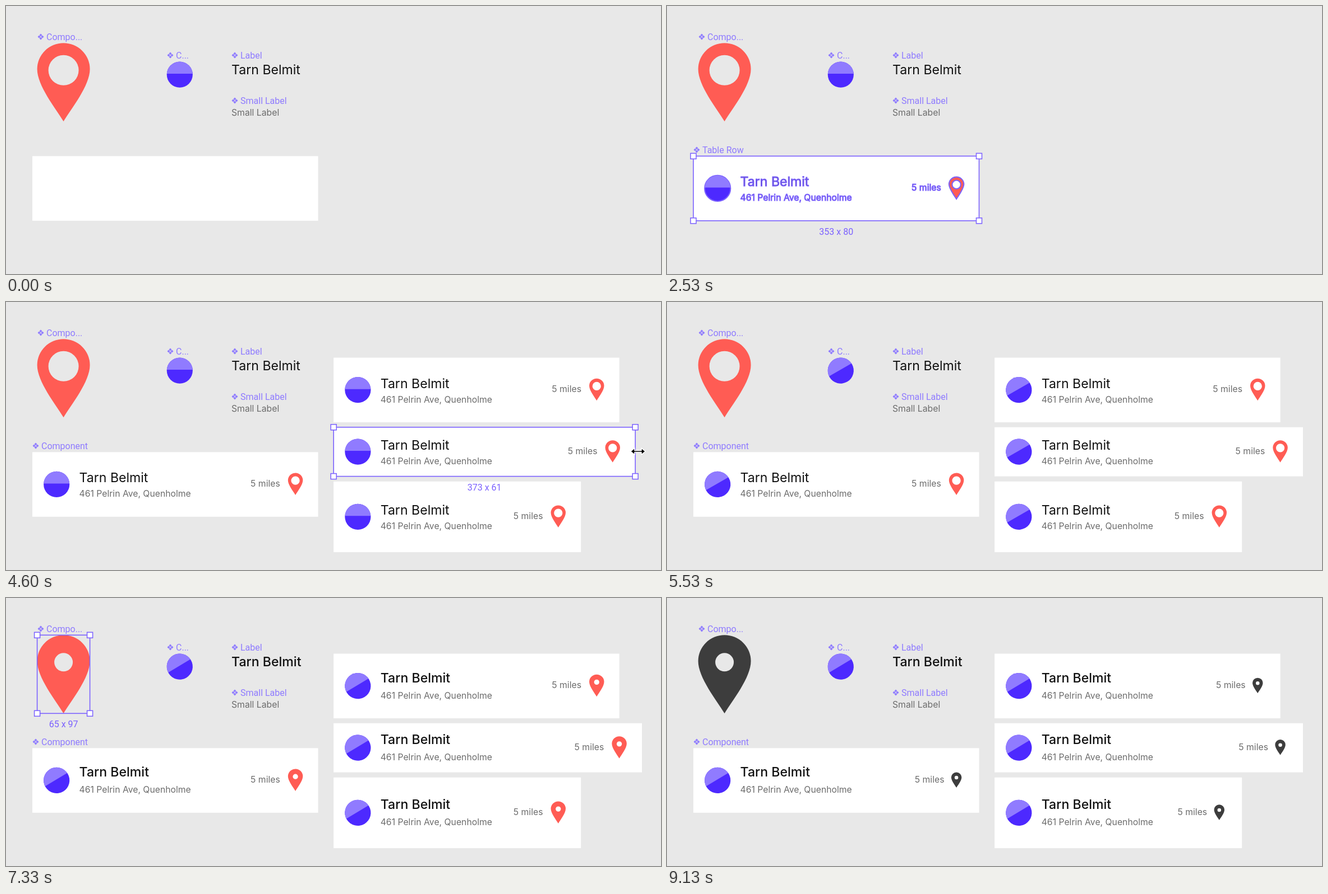
Animation, 1168 px wide and 479 px high, one loop 9.27 s. Source, as an HTML page:

```html
<!DOCTYPE html>
<html lang="en">
<head>
<meta charset="utf-8">
<title>Components</title>
<style>
html, body { margin: 0; height: 100%; overflow: hidden; background: #e8e8e8 }
svg { display: block; width: 100vw; height: 100vh }
.name { font: 23.1px Inter, sans-serif; fill: #111 }
.medium { font-weight: 500 }
.small { font: 15.75px Inter, sans-serif; fill: #6c6c6c }
.label { font: 16px Roboto, sans-serif; fill: #8f7bff }
.size { font: 16px Roboto, sans-serif; fill: #7b61ff; text-anchor: middle }
.end { text-anchor: end }
.sel { fill: none; stroke: #7b61ff; stroke-width: 1.6 }
.grip { fill: #fff; stroke: #7b61ff; stroke-width: 1.5 }
.hot text { stroke: #7b61ff; stroke-width: 1; fill: #6650d0 }
.hot .shape { stroke: #7b61ff; stroke-width: 2; vector-effect: non-scaling-stroke }
.red { fill: none; stroke: #f03a22; stroke-width: 1.7 }
.redline { fill: none; stroke: #cf3d2f; stroke-width: 1.3 }
.dash { fill: none; stroke: #6d7f86; stroke-width: 1.2; stroke-dasharray: 3 2 }
.cursor { fill: #000; stroke: #fff; stroke-width: 1.5; stroke-linejoin: round }
.copy { fill: #fff; stroke: #333; stroke-width: 2; stroke-linejoin: round }
</style>
</head>
<body>
<svg id="stage" viewBox="0 0 1168 479"></svg>
<script>
const LOOP = 9270, STEP = 1000 / 15, UNIT = 509.5 / 353;
const PERSON = 'Tarn Belmit', ADDRESS = '461 Pelrin Ave, Quenholme';
const stage = document.getElementById('stage');

const mix = (a, b, p) => a + (b - a) * p;
const ramp = (t, from, to) => Math.min(1, Math.max(0, (t - from) / (to - from)));
const ease = (t, from, to) => { const p = ramp(t, from, to); return p * p * (3 - 2 * p); };

const text = (cls, x, y, s) => `<text class="${cls}" x="${x}" y="${y}">${s}</text>`;
const path = (cls, d) => `<path class="${cls}" d="${d}"/>`;
const rect = (cls, x, y, w, h) => `<rect class="${cls}" x="${x}" y="${y}" width="${w}" height="${h}"/>`;
const redBox = (x, y, w, h) => rect('red', x + .9, y + .9, w - 1.8, h - 1.8);

function label(x, y, s) {
  const diamonds = [[0, -3], [3, 0], [0, 3], [-3, 0]]
    .map(([dx, dy]) => `M${x + 6 + dx} ${y + dy - 2.5}l2.5 2.5-2.5 2.5-2.5-2.5z`).join('');
  return `<path fill="#8f7bff" d="${diamonds}"/>` + text('label', x + 16, y + 5.7, s);
}

function avatar(x, y, angle) {
  return `<g transform="translate(${x} ${y}) rotate(${angle})">
    <circle class="shape" r="23.1" fill="#4d29ff"/>
    <path fill="#907bff" d="M-23.05-1.5A23.1 23.1 0 0 1 23.05-1.5z"/></g>`;
}

function pin(x, y, scale, look) {
  const r = look.hole;
  return `<path class="shape" fill="${look.color}" fill-rule="evenodd"
    transform="translate(${x} ${y}) scale(${scale}) translate(0 -70)"
    d="M0 140C-14 117-47 76-47 46.5A47 46.5 0 0 1 47 46.5C47 76 14 117 0 140z
       M${-r} 48.5a${r} ${r} 0 0 0 ${2 * r} 0a${r} ${r} 0 0 0 ${-2 * r} 0z"/>`;
}

function row(x, y, w, h, look, parts = {}) {
  const cy = y + h / 2, right = x + w, has = k => parts[k] !== false;
  return `<g class="${parts.hot ? 'hot' : ''}">` + `<rect x="${x}" y="${y}" width="${w}" height="${h}" fill="#fff"/>`
    + (has('avatar') ? avatar(x + 43.2, cy - .1, look.angle) : '')
    + (has('name') ? text('name ' + look.weight, x + 83.5, cy - 3.7 - look.lift, PERSON) : '')
    + (has('address') ? text('small', x + 83.5, cy + 22.4, parts.address || ADDRESS) : '')
    + (has('miles') ? text('small end', right - look.milesGap, cy + 4, '5 miles') : '')
    + (has('pin') ? pin(right - 40.4, cy - .8, look.pinScale, look) : '') + '</g>';
}

function select(x, y, w, h) {
  const grips = [[x, y], [x + w, y], [x, y + h], [x + w, y + h]];
  return rect('sel', x, y, w, h)
    + grips.map(([gx, gy]) => rect('grip', gx - 5, gy - 5, 10, 10)).join('')
    + text('size', x + w / 2, y + h + 25, `${Math.round(w / UNIT)} x ${Math.round(h / UNIT)}`);
}

const ARROW = 'l19 14-9.5 1.5-5.5 8.5z';
const cursor = (x, y) => path('cursor', `M${x} ${y}${ARROW}`);
const copyCursor = (x, y) => path('copy', `M${x + 9} ${y}${ARROW}`) + path('copy', `M${x} ${y}${ARROW}`);
const resizeCursor = (x, y) =>
  path('cursor', `M${x - 13} ${y}l7-6v4.5h12v-4.5l7 6-7 6v-4.5h-12v4.5z`);
const cross = (x, y) => `M${x - 3} ${y - 3}l6 6m0-6l-6 6`;

function draw(t) {
  const within = (a, b) => t >= a && t < b;
  const fade = ramp(t, 7400, 7800), shrink = ease(t, 8470, 8730);
  const channel = from => Math.round(mix(from, 61, fade));
  const look = {
    angle: -31 * ease(t, 5000, 5600),
    weight: t >= 6130 ? 'medium' : '',
    lift: 3 * ramp(t, 6270, 6400),
    hole: mix(27, 16.5, ease(t, 6580, 6860)),
    color: `rgb(${channel(255)},${channel(92)},${channel(84)})`,
    pinScale: mix(.282, .197, shrink),
    milesGap: mix(67.7, 62, ramp(t, 8800, 8930)),
  };
  let out = label(56, 55, 'Compo...') + label(287, 88, 'C...')
    + label(402, 88, 'Label') + label(402, 169, 'Small Label')
    + pin(102.6, 136.3, 1, look) + avatar(309.8, 122.6, look.angle)
    + text('name ' + look.weight, 402, 122.2, PERSON)
    + text('small', 402, 195.7, 'Small Label');

  // Main row, filled piece by piece
  out += row(47, 268.3, 509.5, 115.5, look, {
    avatar: t >= 530, name: t >= 730, address: t < 930 ? false : t < 1130 ? 'Small Label' : ADDRESS,
    pin: t >= 1330, miles: t >= 1730, hot: within(2330, 3200),
  });
  if (t >= 2530) out += label(47, 257, t < 3200 ? 'Table Row' : 'Component');
  if (within(930, 1130)) out += select(130.5, 333, 258.5, 20);
  if (within(1330, 1530)) out += select(503, 305.5, 26.5, 39.5);
  if (within(1730, 1930)) out += select(363, 315, 126, 24);
  if (within(2130, 2330)) out += select(67, 303, 46.4, 46.4);
  if (within(2330, 3200)) out += select(47, 268.3, 509.5, 115.5);

  // Three instances: duplicate, then resize
  const fly = ease(t, 3130, 3400);
  const ax = mix(47, 584.2, fly), ay = mix(268.3, 99.5, fly);
  const by = mix(99.5, 223.8, ease(t, 3400, 3553));
  const bw = mix(509.5, 549.8, ease(t, 4430, 4695)), bh = mix(115.5, 87.8, ease(t, 3600, 3800));
  const cy = mix(223.8, 320.8, ease(t, 3800, 4000));
  const grow = ease(t, 4070, 4400), cw = mix(509.5, 441, grow), ch = mix(87.8, 126.3, grow);
  if (t >= 3200) out += row(ax, ay, 509.5, 115.5, look);
  if (t >= 3450) out += row(584.2, by, bw, bh, look);
  if (t >= 3860) out += row(584.2, cy, cw, ch, look);

  if (within(3200, 3450)) out += select(ax, ay, 509.5, 115.5) + copyCursor(ax + 266, ay + 43);
  if (within(3450, 3600)) {
    const bottom = by + bh - .5;
    out += redBox(584.2, ay, 509.5, 115.5) + redBox(584.2, by, 509.5, bh)
      + path('redline', `M131 ${bottom}H1093.5M839 ${by - 3}v3`
        + [131, 411, 584, 1093.5].map(x => cross(x, bottom)).join(''))
      + `<text class="label" x="846" y="${by + 2.5}" style="fill:#f03a22">2</text>`
      + copyCursor(850, by + 43);
  }
  if (within(3600, 3860)) out += select(584.2, by, bw, bh) + cursor(850, by + bh);
  if (within(3860, 4130)) out += select(584.2, cy, cw, ch) + copyCursor(850, cy + 43);
  if (within(4130, 4460)) out += select(584.2, cy, cw, ch) + cursor(584.2 + cw, cy + ch);
  if (within(4460, 5000)) out += select(584.2, by, bw, bh) + resizeCursor(589 + bw, 267);

  // Label weight and position
  if (within(6070, 6270)) out += select(402, 101, 125, 24.5);
  if (within(6270, 6590)) {
    const top = 300 - look.lift;
    out += path('dash', `M47 ${top + 12.5}H130M259.5 ${top + 6}v15`) + select(130.5, top, 258.5, 24.5);
    const go = ease(t, 6400, 6530);
    out += cursor(mix(200, 101, go), mix(306, 138, go));
  }

  // Pin hole, then pin colour
  if (within(6530, 6600)) out += `<circle class="sel" style="stroke-width:2.6" cx="102.6" cy="114.8" r="27"/>` + cursor(101, 138);
  if (within(6600, 6870)) {
    const r = look.hole;
    out += select(102.6 - r, 114.8 - r, 2 * r, 2 * r) + cursor(102.6 + r, 114.8 + r);
  }
  if (within(6930, 7870)) out += select(55.6, 66.3, 94, 140);

  // Row pin size and its caption
  if (within(8130, 8870)) {
    const w = 94 * look.pinScale, h = 140 * look.pinScale, x = 516.1 - w / 2, y = 325.2 - h / 2;
    out += path('dash', `M${x + w} 325H556.5`) + select(x, y, w, h);
  }
  if (within(8070, 8870)) {
    const go = ease(t, 8000, 8190);
    out += cursor(mix(490, 517, go), mix(372, 323, go));
  }
  if (within(8870, 9130)) out += select(430.7 - look.milesGap, 315, 126, 24);

  stage.innerHTML = out;
}

let shown = -1;
function tick(now) {
  const step = Math.floor((now % LOOP + 4) / STEP);
  if (step !== shown) draw((shown = step) * STEP);
  requestAnimationFrame(tick);
}
draw(0);
requestAnimationFrame(tick);
</script>
</body>
</html>
```
